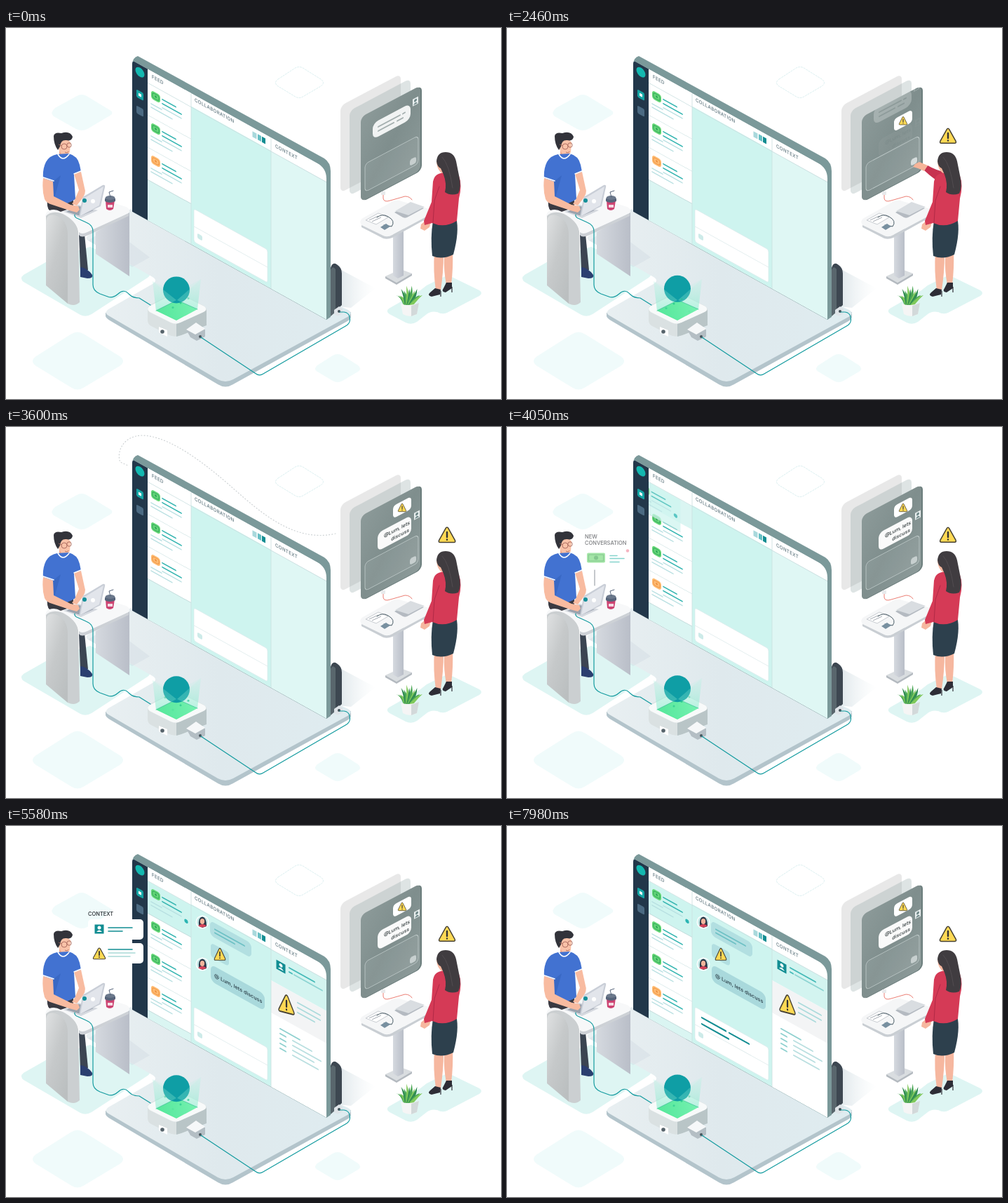
Recreate the animation shown at these times as an HTML page. Size 706x529 px, loop 8 s.

```html
<!DOCTYPE html>
<html lang="en">
<head>
<meta charset="utf-8">
<title>Collaboration scene</title>
<style>
html, body { margin: 0; height: 100%; overflow: hidden; background: #fff; }
svg { display: block; width: 100%; height: 100%; }
text { font-family: Inter, "Open Sans", sans-serif; font-weight: 500; }
.line, .cable { fill: none; stroke-linecap: round; stroke-linejoin: round; }
.cable { stroke: #139b9f; stroke-width: 1.2; }
</style>
</head>
<body>
<svg viewBox="0 0 706 529">
<defs>
  <linearGradient id="slab"><stop stop-color="#eaf0f2"/><stop offset=".5" stop-color="#dfe9ed"/><stop offset="1" stop-color="#dfecf0"/></linearGradient>
  <linearGradient id="panel" x2=".8" y2="1"><stop stop-color="#dfe1e2"/><stop offset=".5" stop-color="#c6c9ca"/><stop offset="1" stop-color="#bbbfc0"/></linearGradient>
  <linearGradient id="leg"><stop stop-color="#d5d9df"/><stop offset="1" stop-color="#b9bec8"/></linearGradient>
  <linearGradient id="phoneFill" x2="1" y2="1"><stop stop-color="#88979500"/><stop stop-color="#8c9a99"/><stop offset=".5" stop-color="#7f8e8d"/><stop offset="1" stop-color="#8d9b9a"/></linearGradient>
  <linearGradient id="shade"><stop stop-color="#b9c9d1" stop-opacity=".6"/><stop offset="1" stop-color="#dfeaee" stop-opacity="0"/></linearGradient>
  <linearGradient id="beam" x2="0" y2="1"><stop stop-color="#b9f3e5" stop-opacity=".35"/><stop offset="1" stop-color="#7be9c6" stop-opacity=".75"/></linearGradient>
  <linearGradient id="pad" x2="1"><stop stop-color="#3fe585"/><stop offset="1" stop-color="#6bf3a4"/></linearGradient>
  <clipPath id="face"><path d="M0 216V5Q0 0 5 0H263Q277 0 277 15V216Z"/></clipPath>
  <clipPath id="glass"><rect width="85" height="120" rx="7"/></clipPath>
  <path id="route" class="line" pathLength="1" d="M470 152C400 168 345 103 300 67C262 36 225 13 195 12C167 12 157 36 163 50L174 55"/>
  <mask id="reveal" maskUnits="userSpaceOnUse" x="0" y="0" width="706" height="529">
    <use href="#route" id="trail" stroke="#fff" stroke-width="8" stroke-dasharray="1 2"/>
  </mask>
  <g id="warn"><path d="M-1.8-9.5Q0-12 1.8-9.5L11.2 7.5Q12.3 10.3 9.5 10.3H-9.5Q-12.3 10.3-11.2 7.5Z" fill="#ffd954" stroke="#454033" stroke-width="1.5"/><path d="M0-4V3M0 6.4V6.6" class="line" stroke="#343434" stroke-width="2.4"/></g>
  <g id="person"><circle r="9.500" fill="#fff"/><circle r="8" fill="#c6e9e7"/><path d="M-5 5Q-6-7 0-7.5Q6-7 6 6L0 8Z" fill="#283345"/><ellipse cy="-1" rx="3.2" ry="4" fill="#f4b49b"/><path d="M-6 5Q0 1 6 5Q0 10-6 5Z" fill="#d8425a"/></g>
  <g id="contact"><rect x="-6.5" y="-6.5" width="13" height="13" fill="#128d92"/><circle cy="-2" r="2.5" fill="#fff"/><path d="M-4 4Q0-1 4 4Z" fill="#fff"/></g>
</defs>

<!-- floor -->
<g fill="#f0fbfb">
  <path d="M70 114L101 97Q108 93 115 97L148 117Q155 121 148 125L116 144Q108 148 100 144L68 126Q62 121 70 114Z"/>
  <path d="M43 468L92 437Q102 430 112 437L162 468Q172 475 162 482L112 512Q102 519 92 512L43 482Q33 475 43 468Z"/>
  <path d="M444 481L466 467Q473 463 480 467L502 481Q508 486 502 490L480 503Q473 507 466 503L444 490Q438 486 444 481Z"/>
  <path d="M388 73L411 58Q418 53 425 58L449 73Q456 78 449 83L425 97Q418 102 411 97L388 83Q381 78 388 73Z" fill="none" stroke="#dcf0f1" stroke-dasharray="3 1"/>
</g>
<g fill="#def5f3">
  <path d="M25 352L62 331L120 312L202 348Q208 352 202 356L122 408Q114 413 106 409L25 362Q19 357 25 352Z"/>
  <path d="M546 400L583 379Q592 374 600 367L622 356Q630 352 638 356L675 374Q681 378 675 382L629 406Q622 409 615 405Q606 403 600 408L586 419Q578 424 570 420L547 408Q541 404 546 400Z"/>
</g>
<path d="M465 338L527 371L492 399L465 396Z" fill="url(#shade)"/>
<path d="M142 406V411Q143 414 148 417L302 508Q313 515 324 508L487 418Q492 415 492 411V405Z" fill="#b3c4cb"/>
<path d="M117 296L178 258L488 402Q496 407 487 412L324 501Q313 507 302 501L146 410Q139 406 146 401L209 365Q217 360 209 355L119 304Q111 300 117 296Z" fill="url(#slab)"/>
<path d="M117 303L148 284L205 327L180 341Z" fill="#c5d2da" opacity=".3"/>
<path d="M463 342Q466 332 473 338Q479 342 479 350V395L463 410Z" fill="#3d4751"/>
<path d="M463 345Q466 338 470 344V405L463 411Z" fill="#59666d"/>
<path d="M468 402L475 397L480 400V407L473 411L468 408Z" fill="#dfe4e8"/><circle cx="475" cy="404" r="2" fill="#44525a"/>

<g id="dots" mask="url(#reveal)"><path d="M470 152C400 168 345 103 300 67C262 36 225 13 195 12C167 12 157 36 163 50L174 55" class="line" stroke="#cdd2d4" stroke-width="1.2" stroke-dasharray="1 3.2"/></g>

<!-- wide screen -->
<path d="M180 51Q181 42 188 40L454 186Q463 192 463 204V412L457 416L180 262Z" fill="#7b999a"/>
<g transform="matrix(1 .555 0 1 180 46)">
  <g clip-path="url(#face)">
    <rect width="277" height="216" fill="#fff"/>
    <rect x="22" y="20" width="62" height="196" fill="#daf5f2"/>
    <g id="rows"></g>
    <g id="newRow"></g>
    <rect x="22" width="62" height="20" fill="#fff"/>
    <rect x="84" y="19" width="114" height="197" fill="#cef4ef"/>
    <rect x="198" y="20" width="79" height="196" fill="#dff7f4"/>
    <g id="context">
      <rect x="198" y="20" width="79" height="196" fill="#fff"/>
      <rect x="198" y="20" width="79" height="44" fill="#d3f4f0"/>
      <rect x="198" y="64" width="79" height="46" fill="#f3f4f5"/>
      <use href="#contact" x="212" y="37"/>
    </g>
    <path d="M22 20H277M84 0V216M198 0V216" stroke="#c9dedf" stroke-width=".8"/>
    <path d="M0 0H22V216H0Z" fill="#22374a"/>
    <circle cx="11" cy="11" r="6.5" fill="#14b8b0"/>
    <rect x="6" y="38" width="10" height="11" rx="2" fill="#14a6a5"/><rect x="9" y="41.500" width="4" height="4" fill="#fff"/>
    <rect x="6" y="61" width="10" height="11" rx="2" fill="#4b6a82"/>
    <rect x="171.500" y="6" width="6" height="8" fill="#a9d9dc"/><rect x="179" y="6" width="5" height="8" fill="#67bfc4"/><rect x="185" y="6" width="5" height="8" fill="#128d92"/>
    <g fill="#5e757e" font-size="6.800" letter-spacing=".4">
      <text transform="translate(28 10) scale(.9 1)">FEED</text>
      <text transform="translate(89 9) scale(.9 1)">COLLABORATION</text>
      <text transform="translate(204 11) scale(.9 1)">CONTEXT</text>
    </g>
    <g id="chat">
      <g><rect x="111" y="27" width="59" height="21" rx="6" fill="#b2dfe1"/><path class="line" d="M118 36H160M118 41H146" stroke="#6ec1c5" stroke-width="2"/></g>
      <g><rect x="112" y="58" width="26" height="20" rx="5" fill="#b2dfe1"/></g>
      <g><rect x="112" y="89" width="77" height="24" rx="7" fill="#a9d9dc"/><text x="117" y="104" font-size="7.200" fill="#253740">@ Lum, lets discuss</text></g>
    </g>
    <rect x="88" y="163" width="105" height="47" rx="3" fill="#fff" stroke="#d9e9ea" stroke-width=".6"/>
    <path d="M88 188H193" stroke="#dce9ea" stroke-width=".8"/>
    <rect x="93" y="195" width="7" height="7" rx="2" fill="#cdebe9"/>
    <g class="line" stroke="#148d92" stroke-width="2.300" id="typed">
      <path pathLength="1" d="M98 173H132"/><path pathLength="1" d="M137 173H165"/><path pathLength="1" d="M98 182H136"/>
    </g>
  </g>
</g>
<g id="screenIcons">
  <use href="#person" transform="translate(280 137)"/>
  <use href="#warn" transform="translate(305 183) scale(.68 .8)"/>
  <use href="#person" transform="translate(280 197)"/>
  <use href="#warn" transform="matrix(.95 .25 0 1.2 400 254)"/>
</g>

<!-- projector -->
<path d="M202 401Q202 396 207 394L237 379Q243 376 249 379L282 396Q286 398 286 402V423L250 438Q240 442 231 437L207 425Q202 422 202 417Z" fill="#dae1e2"/>
<path d="M204 397L237 380Q243 377 249 380L283 397Q288 401 282 405L249 420Q242 423 235 420L205 405Q200 401 204 397Z" fill="#f8fafa"/>
<path d="M243 422L249 420L282 405Q286 403 286 401V424L250 438L243 440Z" fill="#b9c5c7"/>
<path d="M214 403L244 388L273 401L243 417Z" fill="url(#pad)"/>
<path d="M209 361L243 377V416L214 403Z M278 358L243 377V416L273 401Z" fill="url(#beam)" opacity=".45"/>
<path d="M214 403L244 388L273 401M244 388V370" class="line" stroke="#38bd94" stroke-width=".8"/>
<circle id="emblem" cx="243" r="19" fill="#0f9ea5"/>
<path d="M209 361L214 403L243 388Z M278 358L273 401L244 388Z" fill="url(#beam)" opacity=".5"/>
<g id="sparks" fill="#1cc18b"></g>
<path d="M218 426L230 431V440L218 434Z" fill="#fff"/><circle cx="223" cy="433" r="2.800" fill="#56636b"/>
<path d="M257 430L271 420L284 430V440L272 446L263 441Z" fill="#b4bec4"/><path d="M257 430L271 420L284 429L270 437Z" fill="#f6f8f9"/><circle cx="277" cy="440" r="2" fill="#46535b"/>
<path class="cable" d="M278 441L355 492Q361 497 367 493L486 424Q492 420 490 412Q489 406 482 405H476"/>

<!-- desk and man -->
<path d="M104 294H112L117 345H106Z" fill="#3b4552"/><path d="M106 341Q116 342 123 352Q125 357 116 357L106 355Z" fill="#2b3f70"/>
<path d="M128 291L176 263V354L128 322Z" fill="url(#leg)"/>
<path d="M57 266L70 259Q99 268 103 290L105 391Q98 398 88 393V302Q88 283 57 279Z" fill="#cbcfd1"/>
<path d="M57 278Q57 264 70 267Q88 273 88 295V393L57 367Z" fill="url(#panel)"/>
<path d="M56 269Q56 262 64 258L112 236L171 255Q178 258 175 264L117 291Q106 298 104 290Q99 274 81 265Q65 259 56 269Z" fill="#f7f8f9"/>
<path d="M104 291Q108 295 116 291L175 264V268L118 295Q107 300 104 295Z" fill="#cdd1d6"/>
<path d="M59 244Q58 257 62 260Q70 257 78 262L96 256V243Z" fill="#3a3a42"/>
<path d="M82 262L103 252L131 260L107 271Z" fill="#d5d9df"/><path d="M86 262L104 254L125 260L106 268Z" fill="#9ba2ad"/>
<path d="M76 172H90V185Q83 190 76 184Z" fill="#efa789"/>
<path d="M72 158Q84 153 92 163L91 177Q87 184 80 181Q74 175 72 158Z" fill="#f9c2a8"/>
<path d="M68 154Q69 148 79 150Q91 146 95 155Q94 162 86 160Q78 159 77 169L74 174Q68 166 68 154Z" fill="#32333a"/>
<g fill="none" stroke="#a9685c" stroke-width=".9"><circle cx="83" cy="169" r="4"/><circle cx="90" cy="167" r="3.200"/><path d="M79 168L75 166M84 177Q88 179 89 176"/></g>
<path d="M73 180L89 179Q102 182 105 195L107 205L97 209L99 244Q80 257 60 248L67 219L53 214Q52 201 57 191Q62 182 73 180Z" fill="#4272d1"/>
<path d="M67 219L78 210L69 242" fill="#2f5db8" opacity=".5"/>
<g id="arms" fill="#f8bba0">
  <path d="M53 214Q51 231 55 244Q58 250 66 252L90 260L101 263L105 259L103 254L92 252L68 240L67 219Z"/>
  <path d="M97 208L104 231L98 245L94 251L101 253L108 244Q115 235 112 228L107 205Z"/>
</g>
<path d="M74 180Q81 192 90 180M53 213L68 218M97 208L107 204" class="line" stroke="#fff" stroke-width="1.500"/>
<path d="M104 269L109 243Q110 240 113 239L138 224Q142 223 141 227L135 254Z" fill="#c9ced7"/><path d="M106 268L111 243L139 226L133 253Z" fill="#e2e5eb"/>
<circle cx="112" cy="246" r="3" fill="#138f97"/><circle cx="124" cy="247" r="3" fill="#fff"/>
<path d="M142 246H155L153 258Q148 262 143 258Z" fill="#cd4472"/><path d="M141 243H156V247Q148 251 141 247Z" fill="#56647a"/><ellipse cx="148.500" cy="242" rx="7" ry="3" fill="#6c798c"/><path d="M149 241L147 234L153 232" class="line" stroke="#56647a"/><path d="M145 252H152V256H145Z" fill="#fff" opacity=".8"/>
<path class="cable" d="M98 266Q97 270 103 272L114 277Q124 281 124 290V366Q124 375 134 379L145 383Q152 386 160 379Q168 371 176 380Q181 385 190 385L206 395"/>

<!-- pop-ups beside the man -->
<path id="stem" class="line" stroke="#8b9299" stroke-width="1"/>
<g id="news">
  <g font-size="7.500" fill="#24272c" font-weight="600"><text x="111" y="153">NEW</text><text x="111" y="162.500">CONVERSATION</text></g>
  <rect x="114" y="174" width="26" height="14" rx="2" fill="#69d56e"/><rect x="116.500" y="176.500" width="21" height="9" fill="none" stroke="#35a447"/><circle cx="127" cy="181" r="3" fill="#35a447"/>
  <path class="line" d="M147 178H157M147 182H167M147 187H160" stroke="#35b7ab" stroke-width="1.600"/><circle cx="172" cy="171" r="2.200" fill="#f08497"/>
</g>
<g id="cards">
  <text y="4" font-size="7.500" fill="#24272c">CONTEXT</text>
  <g fill="#fff"><rect y="9" width="79" height="29" rx="5"/><rect y="43" width="79" height="29" rx="5"/></g>
  <use href="#contact" x="16" y="23"/><use href="#warn" transform="translate(16 58) scale(.75)"/>
  <path class="line" d="M29 21H63M29 26H49M29 52H63" stroke="#128d92" stroke-width="1.600"/><path class="line" d="M29 57H67M29 62H60" stroke="#a9d9d6" stroke-width="1.500"/>
  <g id="cardShade" fill="#42485a"><rect y="9" width="79" height="29" rx="5"/><rect y="43" width="79" height="29" rx="5"/></g>
</g>

<!-- tall display -->
<g transform="matrix(1 -.53 0 1 477 111)"><rect width="86" height="124" rx="7" fill="#777" opacity=".17"/></g>
<g transform="matrix(1 -.53 0 1 490 118)"><rect width="87" height="121" rx="7" fill="#76908f" opacity=".24"/></g>
<g transform="matrix(1 -.53 0 1 508 127)"><rect width="85" height="121" rx="7" fill="#6b7d7c"/></g>
<g transform="matrix(1 -.53 0 1 506 127)">
  <rect width="85" height="121" rx="7" fill="url(#phoneFill)"/>
  <g clip-path="url(#glass)">
    <g id="oldMessage">
      <rect x="17" y="18" width="54" height="23" rx="8" fill="#f1f3f3"/>
      <path class="line" d="M25 27H56M25 33H47M60 27H63M52 33H60" stroke="#a4afaf" stroke-width="2"/>
      <path d="M74 14H82V24H74Z" fill="#e8eeee"/><circle cx="78" cy="17.500" r="2" fill="#71898a"/><path d="M75 23Q78 18 81 23Z" fill="#71898a"/>
    </g>
    <rect id="alertBubble" x="46" y="28" width="26" height="18" rx="5" fill="#fff"/>
    <g id="reply">
      <rect x="24" y="37" width="48" height="26" rx="7" fill="#fafafa"/>
      <g font-size="7" fill="#293335" text-anchor="end"><text x="70" y="48.500">@Lum, lets</text><text x="69" y="58.500">discuss</text></g>
      <path d="M76 36H84V46H76Z" fill="#e8eeee"/><circle cx="80" cy="39.500" r="2" fill="#71898a"/><path d="M77 45Q80 40 83 45Z" fill="#71898a"/>
    </g>
  </g>
  <rect x="6" y="70" width="76" height="40" rx="5" fill="#fff" fill-opacity=".06" stroke="#c2cdcc" stroke-width=".8"/>
  <rect id="button" x="70" y="98" width="9" height="9" rx="3" fill="#d5dcdc"/>
</g>
<use href="#warn" id="phoneAlert"/>
<use href="#warn" id="alertIcon"/>

<!-- table and woman -->
<path class="line" d="M538 236V243Q539 249 548 246L569 240Q576 240 579 245" stroke="#ec7e74"/><path d="M535 233H541V238H535Z" fill="#e8eaec"/>
<path d="M541 354L563 344L579 350L557 363Z" fill="#d9dde0"/><path d="M541 354L557 363L579 350V353L557 366L541 357Z" fill="#b4bac0"/>
<path d="M552 280H567V353L559 357L552 353Z" fill="url(#leg)"/>
<path d="M509 271L552 247Q558 244 564 247L604 258Q611 262 604 267L551 295Q544 299 538 296L508 282Q502 276 509 271Z" fill="#f5f6f7"/><path d="M507 281L538 296Q544 299 551 295L607 265V268L551 299Q544 302 538 300L507 284Z" fill="#c9ced3"/>
<path d="M554 263L576 250L596 257L574 269Q570 272 566 270Z" fill="#b4bac1"/><path d="M555 261L577 248L597 255L574 267Z" fill="#d9dde1"/>
<path d="M513 274L531 264L545 270L528 280Z" fill="#fff" stroke="#c8ccd1"/><path d="M518 274L531 268M522 276L535 270" stroke="#a5abb3"/><path class="line" d="M529 270Q537 264 545 269Q556 275 550 283L539 281" stroke="#4a5c66"/><path d="M534 284L542 279L548 283L540 288Z" fill="#7890a0"/>
<g id="tapArm"><path d="M624 205Q612 203 600 196L595 203Q610 217 624 224Z" fill="#c73250"/><path d="M600 196L588 191L582 194L579 198L586 200L595 204Z" fill="#f6b499"/></g>
<path d="M611 320Q609 346 613 374H620Q624 348 624 324H625Q624 346 628 366H635Q638 342 637 318Z" fill="#f6b79f"/>
<path d="M612 371L620 373L619 380L607 383Q600 381 605 377Z M628 363L636 363V371L627 377Q620 376 624 371Z" fill="#2d2d36"/><path d="M620 375V383M636 369V377" stroke="#2d2d36" stroke-width="1.200"/>
<path d="M609 275L642 270Q647 290 638 323Q622 331 608 325Q605 298 609 275Z" fill="#2d404d"/>
<path d="M606 277L604 284L597 289L591 286L592 280L598 275Z" fill="#f6b79f"/>
<path d="M617 208Q633 202 646 211Q651 224 646 243L643 275Q625 286 608 278L597 281L596 275L607 248L609 219Q611 210 617 208Z" fill="#d53a56"/>
<path d="M609 278L611 246L618 226" class="line" stroke="#b02946"/>
<path d="M614 191Q615 203 622 207L631 204L627 185Z" fill="#f6b79f"/>
<path d="M614 190Q615 177 627 177Q639 177 642 190L646 210Q650 227 645 236Q634 240 626 234Q629 222 624 209L620 200Q615 198 614 190Z" fill="#403c40"/>
<path d="M622 184Q632 194 637 228" class="line" stroke="#524c50"/>
<g id="plant"></g>
<path d="M563 393Q575 398 589 392L586 408Q576 414 566 408Z" fill="#f5f5f5"/><path d="M578 396L589 392L586 408L578 411Z" fill="#d2d9da"/>
</svg>
<script>
const $ = id => document.getElementById(id);
const LOOP = 8000;

const row = (y, color, dark, back = '#fff') => `<g transform="translate(0 ${y})">
  <rect x="22" width="62" height="46" fill="${back}"/><path d="M22 46H84" stroke="#c3dcdc"/>
  <rect x="27" y="7.500" width="13" height="12" rx="4" fill="${color}"/>
  <rect x="29" y="10" width="9" height="7" rx="2" fill="none" stroke="${dark}"/><circle cx="33.500" cy="13.500" r="1.500" fill="${dark}"/>
  <path class="line" d="M43 12H62M43 18H70" stroke="#35b5b1" stroke-width="1.800"/>
  <path class="line" d="M27 27H42M27 32H57M43 24H70" stroke="#b7dfe1" stroke-width="1.500"/></g>`;
$('rows').innerHTML = row(20, '#67d878', '#2fa55a') + row(66, '#67d878', '#2fa55a') + row(112, '#ffbd74', '#ee9344');
$('newRow').innerHTML = row(20, '#67d878', '#2fa55a', '#cef4ef') + '<circle cx="77" cy="47" r="2.700" fill="#2bb5b3"/>';

const bar = (x, y, width, color) => `<path class="line" d="M${x} ${y}h${width}" stroke="${color}" stroke-width="2"/>`;
let bars = bar(224, 32, 36, '#44bab8') + bar(224, 38, 4, '#44bab8') + bar(231, 38, 40, '#8dd4d2');
for (let i = 0; i < 3; i++) bars += bar(236, 75 + i * 7, [32, 32, 24][i], '#acdbdc');
for (let i = 0; i < 5; i++) bars += bar(211, 126 + i * 7, i ? 8 : 28, '#8ed0cf') + (i ? bar(229, 126 + i * 7, [0, 27, 40, 30, 36][i], '#b9dfe0') : '');
$('context').innerHTML += bars;

for (let i = 0; i < 11; i++) {
  const spread = (i - 5) / 5, x = 575 + spread * 19, y = 367 + spread * spread * 14 + i % 2 * 5;
  $('plant').innerHTML += `<path d="M${571 + spread * 4} 395Q${574 + spread * 12} 382 ${x} ${y}Q${579 + spread * 12} 383 ${577 + spread * 4} 395Z" fill="${['#4aa755', '#80c95b', '#318c52'][i % 3]}"/>`;
}
$('sparks').innerHTML = '<circle r="1.500"/>'.repeat(4);

const clamp = v => Math.max(0, Math.min(1, v));
const progress = (t, from, to) => clamp((t - from) / (to - from));
const ease = (t, from, to) => { const p = progress(t, from, to); return p * p * (3 - 2 * p); };
const mix = (a, b, p) => a + (b - a) * p;
const show = (node, opacity) => node.setAttribute('opacity', opacity);
const place = (node, transform, opacity = 1) => {
  node.setAttribute('transform', transform);
  show(node, opacity);
};

function drawDisplay(t) {
  const sent = ease(t, 2080, 2400), replied = ease(t, 2420, 2760);
  const pop = progress(t, 250, 600);
  const size = (pop + .25 * Math.sin(pop * Math.PI)) * (1 + .02 * Math.sin(t / 250));
  place($('alertIcon'), `translate(629 ${154 + 7 * (1 - pop)}) scale(${size})`, pop);
  place($('oldMessage'), `translate(0 ${-20 * sent - 18 * replied})`, (1 - .7 * sent) * (1 - replied));
  const alertY = 9 * (1 - sent) - 18 * replied;
  place($('alertBubble'), `translate(0 ${alertY})`, sent);
  place($('phoneAlert'), `translate(565 ${133 + alertY}) scale(.5 .55)`, sent);
  place($('reply'), `translate(0 ${9 * (1 - replied)})`, replied);
  const raised = ease(t, 1650, 2020) * (1 - ease(t, 2700, 3080));
  place($('tapArm'), `rotate(${-88 * (1 - raised)} 624 214)`, clamp(raised * 5));
  show($('button'), t > 2030 && t < 2600 ? 1 : .8);
}

function drawScreen(t) {
  const added = ease(t, 3800, 4180);
  $('trail').setAttribute('stroke-dashoffset', 1 - ease(t, 2700, 3500));
  show($('dots'), 1 - ease(t, 3700, 3980));
  place($('rows'), `translate(0 ${46 * added})`);
  place($('newRow'), `translate(${-62 * (1 - added)} 0)`, added);
  const steps = [4150, 4300, 4450].map(start => ease(t, start, start + 230));
  [...$('chat').children].forEach((bubble, i) => place(bubble, `translate(0 ${8 * (1 - steps[i])})`, steps[i]));
  const context = ease(t, 4500, 4800);
  show($('context'), context);
  // Both avatars flank the small warning, so the icons follow the chat steps one by one.
  [steps[0], steps[1], steps[2], context].forEach((p, i) => show($('screenIcons').children[i], p));
  [...$('typed').children].forEach((stroke, i) => {
    const p = progress(t, 7350 + i * 180, 7530 + i * 180);
    stroke.setAttribute('stroke-dasharray', '1 2');
    stroke.setAttribute('stroke-dashoffset', 1 - p);
    show(stroke, p > 0 ? 1 : 0);
  });
}

function drawPopups(t) {
  const arrive = ease(t, 3880, 4180), leave = ease(t, 5000, 5220);
  place($('news'), `translate(0 ${14 * (1 - arrive)})`, arrive * (1 - leave));
  const foot = mix(226, 218, ease(t, 4750, 4950)), stemTop = mix(foot, 203, ease(t, 3850, 4080));
  $('stem').setAttribute('d', `M125 ${foot}V${stemTop}`);
  show($('stem'), t > 3850 ? 1 - leave : 0);

  const enter = ease(t, 5250, 5530), settle = ease(t, 5600, 5900), exit = progress(t, 6800, 7250) ** 2;
  const scale = mix(mix(1, .92, settle), .35, exit);
  const x = mix(mix(135, 117, enter) - 7 * settle, 80, exit);
  place($('cards'), `translate(${x} ${153 - 29 * scale}) scale(${scale})`, enter * (1 - ease(t, 6990, 7250)));
  show($('cardShade'), .3 * ease(t, 6500, 6850));
}

function drawProjector(t) {
  $('emblem').setAttribute('cy', 373 + 1.3 * Math.cos((t - 1600) / 1000 * Math.PI));
  [...$('sparks').children].forEach((spark, i) => {
    const p = (t / 2000 + i * .27) % 1;
    place(spark, `translate(${227 + i * 11} ${405 - 24 * p})`, Math.sin(p * Math.PI) * .7);
  });
  const typing = t > 7320 ? Math.sin((t - 7320) / 55) * .6 : 0;
  place($('arms'), `translate(0 ${typing})`);
}

function frame(now) {
  const t = now % LOOP;
  drawDisplay(t);
  drawScreen(t);
  drawPopups(t);
  drawProjector(t);
  requestAnimationFrame(frame);
}
frame(0);
</script>
</body>
</html>
```
